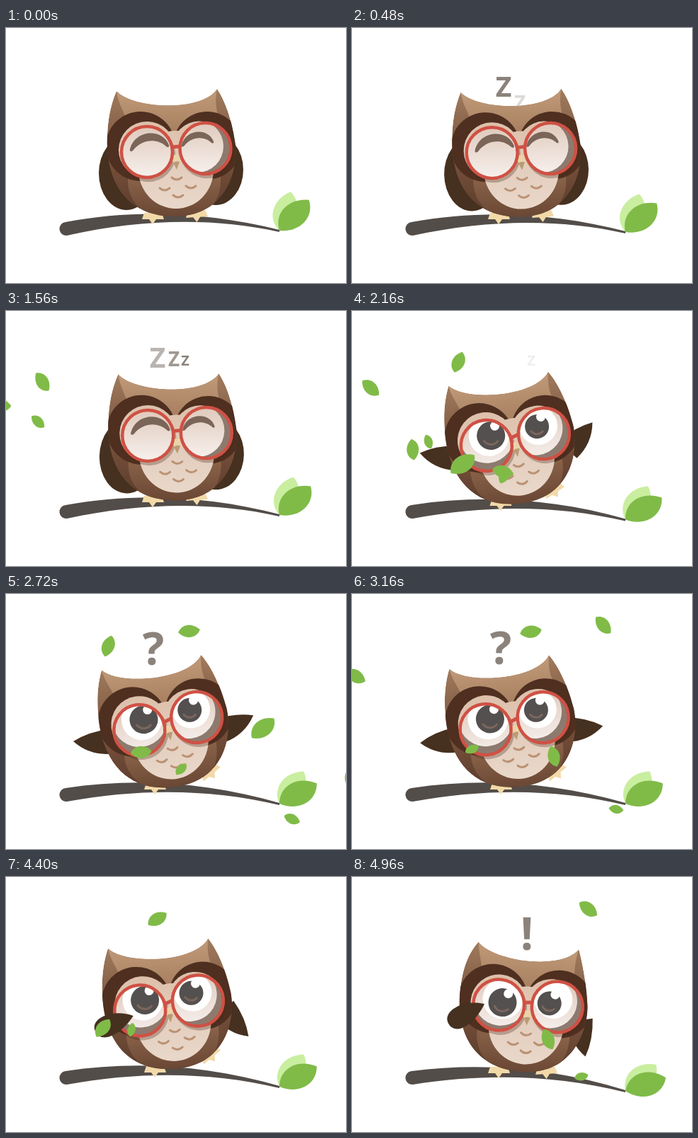
An HTML page with a canvas for the animation above (5 s loop, 480 px wide and 360 px high).

```html
<!DOCTYPE html>
<html lang="en">
<head>
<meta charset="utf-8">
<title>Sleepy owl</title>
<style>
html, body { margin: 0; width: 100%; height: 100%; overflow: hidden; background: #fff; }
canvas { display: block; }
</style>
</head>
<body>
<canvas id="stage" width="480" height="360"></canvas>
<script>
const ctx = document.getElementById('stage').getContext('2d');
const LOOP = 5000, WAKE = 2080, ARM_UP = 4150;
const GREEN = '#80bb48', LIGHT_GREEN = '#c9ee9f', DARK = '#46301f', MASK = '#4e2f20';
const RED = '#cf5144', LID = '#7a6558';

// Wind lanes: height and angle of a leaf at x
const TOP = x => [43 + 75 * (1 - x / 400) ** 2, 25 + .57 * x];
const MIDDLE = x => [230 - 90 * (1 - x / 400) ** 4, 10 + .85 * x];
const LOW = x => [136 + .45 * x, 20 + .45 * x];

// lane, length, time of entry, speed, drift away from the lane
const LEAVES = [
  [TOP, 31, 1070, 125, 0], [TOP, 31, 1930, 175, 0], [TOP, 31, 3000, 128, 0],
  [MIDDLE, 30, 1500, 136, 0], [MIDDLE, 42, 1600, 276, -60], [MIDDLE, 31, 1600, 367, 15],
  [MIDDLE, 21, 2760, 428, -30], [MIDDLE, 31, 3650, 177, 0],
  [LOW, 24, 1310, 232, 0], [LOW, 21, 1560, 184, 0], [LOW, 20, 3480, 177, 0]
];

const mix = (a, b, p) => a + (b - a) * p;
const ramp = (t, from, to) => Math.min(1, Math.max(0, (t - from) / (to - from)));
const smooth = (t, from, to) => { const p = ramp(t, from, to); return p * p * (3 - 2 * p); };
const brake = (t, from, to) => 1 - (1 - ramp(t, from, to)) ** 2;

function poseAt(t) {
  const wake = smooth(t, 1950, 2240);
  const settle = ramp(t, 2240, 4500);
  const alert = smooth(t, 4600, 4860);
  const tilt = wake * (1 - alert);
  return {
    t, alert, tilt,
    awake: t >= WAKE,
    lean: mix(wake * (4 * settle - 8.3), 5.5, alert) - .8 * Math.sin(t / 310) * (1 - wake),
    x: 2 * tilt - alert,
    y: mix(smooth(t, 0, 480) + wake * (10 - 4 * settle), 6, alert),
    ear: 6 * alert,
    droop: 2 * smooth(t, 0, 480) + 8 * wake + 6 * alert,
    slip: 5 * tilt,
    face: -5 * settle * (1 - alert)
  };
}

function fill(path, color) {
  ctx.fillStyle = color;
  ctx.fill(new Path2D(path));
}

function line(path, color, width) {
  ctx.strokeStyle = color;
  ctx.lineWidth = width;
  ctx.lineCap = 'round';
  ctx.stroke(new Path2D(path));
}

function oval(x, y, rx, ry, color) {
  ctx.beginPath();
  ctx.ellipse(x, y, rx, ry, 0, 0, 7);
  ctx.fillStyle = color;
  ctx.fill();
}
const dot = (x, y, r, color) => oval(x, y, r, r, color);

function arc(x, y, r, color, width, from = 0, to = 7) {
  ctx.beginPath();
  ctx.arc(x, y, r, from, to);
  ctx.strokeStyle = color;
  ctx.lineWidth = width;
  ctx.stroke();
}

function shade(y0, y1, ...colors) {
  const g = ctx.createLinearGradient(0, y0, 0, y1);
  colors.forEach((c, i) => g.addColorStop(i / (colors.length - 1), c));
  return g;
}

function placed(x, y, degrees, draw, flip = 1) {
  ctx.save();
  ctx.translate(x, y);
  ctx.scale(flip, 1);
  ctx.rotate(degrees * Math.PI / 180);
  draw();
  ctx.restore();
}

function leaf(x, y, degrees, len, color, start = 0) {
  const k = len * .38;
  placed(x, y, degrees, () => {
    ctx.translate(start, 0);
    fill(`M0 0C${len * .2} ${-k} ${len * .7} ${-k} ${len} 0C${len * .8} ${k} ${len * .3} ${k} 0 0Z`, color);
  });
}

function flyingLeaves(t) {
  for (const [lane, len, enter, speed, drift] of LEAVES) {
    const s = (t - enter) / 1000;
    if (s < 0) continue;
    const x = speed * (s + .2 * s * s) - 16;
    const [y, angle] = lane(x);
    leaf(x, y + drift * (x / 400) ** 4, angle, len, GREEN, -len / 2);
  }
}

function sign(text, x, y, size, alpha) {
  ctx.globalAlpha = alpha;
  ctx.fillStyle = '#8b827b';
  ctx.font = `bold ${size}px "Open Sans", sans-serif`;
  ctx.textAlign = 'center';
  ctx.fillText(text, x, y + size * .357);
  ctx.globalAlpha = 1;
}

function signs(t) {
  [[214, 39], [237, 28], [253, 20]].forEach(([x, size], i) => {
    const start = 280 + i * 140, fade = 1300 + i * 150;
    sign('Z', x, 115 + 2 * i - 49 * brake(t, start, start + 500), size,
      ramp(t, start, start + 200) * (1 - ramp(t, fade, fade + 650)));
  });
  const drift = ramp(t, 2720, 3600);
  sign('?', 208 + 4 * drift, 117 - 2 * drift - 40 * brake(t, 2300, 2600), 64,
    ramp(t, 2300, 2450) * (1 - ramp(t, 3300, 3950)));
  sign('!', 247, 120 - 40 * brake(t, 4660, 4880), 64, ramp(t, 4660, 4800));
}

function branch(d) {
  const y = 286 + d;
  leaf(386, y, -74 + d * 2.1, 57, LIGHT_GREEN);
  fill(`M84 274C184 ${255 + d * .4} 285 ${260 + d * .6} 386 ${y - 1}V${y + 2}
    C290 ${267 + d * .8} 190 ${270 + d * .4} 86 293A9.5 9.5 0 0 1 84 274Z`, '#534d49');
  leaf(386, y, -46 + d * 1.75, 60, GREEN);
}

const foot = (x, y, angle) => placed(x, y, angle, () =>
  fill('M-12-8L-15 1-5 1 0 8 5 1 16 1 13-8Z', '#f2d9a8'));

const wing = (x, y, angle, flip) => placed(x, y, angle, () =>
  fill('M-8-17Q22-14 44 0Q22 20-8 18Z', DARK), flip);

function wings({ t, awake }) {
  if (!awake) {
    oval(170, 205, 39, 52, DARK);
    oval(296, 200, 39, 50, DARK);
    return;
  }
  wing(318, 193, -17 + .042 * (t - 2720), 1);
  if (t < ARM_UP) wing(147, 189, -7 + .013 * (t - 2720), -1);
}

const arm = ({ alert }) => placed(144, 199, mix(-17, -34, alert), () =>
  fill('M42 0C20-20-16-20-16 0C-16 20 14 20 42 0Z', DARK));

function body(ear) {
  const l = 156 + ear, r = 298 + ear;
  const top = `C${r - 22} 119 ${l + 23} 114 ${l} 89`;
  const outline = `M${r} 86C311 105 320 135 324 165C328 210 305 266 238 266
    C175 266 146 225 143 170C142 135 147 110 ${l} 89C${l + 23} 114 ${r - 22} 119 ${r} 86Z`;
  const cream = shade(128, 255, '#dcbfa9', '#e3ccbc', '#e9d8ca');
  ctx.save();
  ctx.clip(new Path2D(outline));
  fill(outline, shade(88, 265, '#a07b5d', '#7b543e', '#5a3b2b'));
  fill(`M${l} 89C${l + 4} 115 172 120 172 150V215C172 250 200 270 238 270
    C280 270 303 250 303 215V150C303 125 ${r - 6} 115 ${r} 86${top}Z`,
    shade(95, 265, '#bd9776', '#9a7153', '#6b4835'));
  dot(190, 167, 49, MASK);
  dot(284, 166, 48, MASK);
  dot(199, 172, 40, cream);
  dot(273, 170, 38.5, cream);
  oval(240, 200, 53, 55, cream);
  ctx.restore();
  for (const [x, y] of [[241, 212], [224, 227], [261, 224], [243, 237]])
    line(`M${x - 7} ${y - 1}q7 6 14 0`, '#bb9274', 3);
}

function eye(x, y, r, iris, dx, dy) {
  dot(x, y, r, '#fff');
  dot(x + dx, y + dy, iris, '#54504f');
  arc(x + dx, y + dy, iris * .62, '#7b665d', 3, .8, 2.6);
  dot(x + dx + 7, y + dy - 13, 6.5, '#fff');
}

const lid = (x, y, width) => placed(x, y, 0, () => {
  ctx.scale(width / 55, width / 55);
  fill('M0 17C7-11 46-13 55 11C56 15 53 15 51 13C38 1 17 3 5 18C3 21-1 21 0 17Z', LID);
});

// A lens shows a bright patch over its shaded rim
function lens(x, y, r, [px, py, pr], content) {
  ctx.save();
  ctx.beginPath();
  ctx.arc(x, y, r, 0, 7);
  ctx.clip();
  dot(x, y, r, '#8d7a6f');
  dot(px, py, pr, shade(y - r, y + r, '#dfcabc', '#f7f0ed'));
  content();
  ctx.restore();
}

function face({ awake, slip, alert }) {
  const left = [199, 175 + slip, 36], right = [281.5, 170 + slip * .5, 36];
  for (const [x, y, r] of [left, right]) arc(x + 2, y + 4, r, 'rgba(70,40,25,.3)', 4.5);
  const dx = -3 * alert, dy = 5 * alert;
  lens(...left, awake ? [201, 165, 39] : [200, 173, 42], () =>
    awake ? eye(204, 166, 28.5, 20, 3 + dx, dy) : lid(175, 154, 55));
  lens(...right, awake ? [271, 163, 38] : [270, 167, 37], () =>
    awake ? eye(275, 160, 27, 17, dx - 2, 1 + dy) : lid(248, 151, 45));
  fill('M233 183Q240 174 248 183L241 200Z', '#ead3aa');
  fill('M236 190Q241 187 245 189L241 200Z', '#b99b75');
  arc(...left, RED, 4.5);
  arc(...right, RED, 4.5);
  line(`M236 ${left[1] - 7}L245 ${right[1] - 3}`, RED, 5);
}

function owl(pose) {
  placed(208 + pose.x, 270 + pose.y, pose.lean, () => {
    ctx.translate(-208, -270);
    wings(pose);
    body(pose.ear);
    placed(pose.face, 0, 0, () => face(pose));
    if (pose.t >= ARM_UP) arm(pose);
  });
}

function draw(t) {
  const pose = poseAt(t), { tilt, alert } = pose;
  ctx.fillStyle = '#fff';
  ctx.fillRect(0, 0, 480, 360);
  signs(t);
  branch(pose.droop);
  foot(207 + 3 * tilt, 269 + 6 * tilt + 7 * alert, 0);
  foot(269 + 21 * tilt + 5 * alert, 266 - 12 * tilt + 11 * alert, -4 - 36 * tilt);
  owl(pose);
  flyingLeaves(t);
}

const begin = performance.now();
function tick() {
  draw((performance.now() - begin) % LOOP);
  requestAnimationFrame(tick);
}
tick();
</script>
</body>
</html>
```
